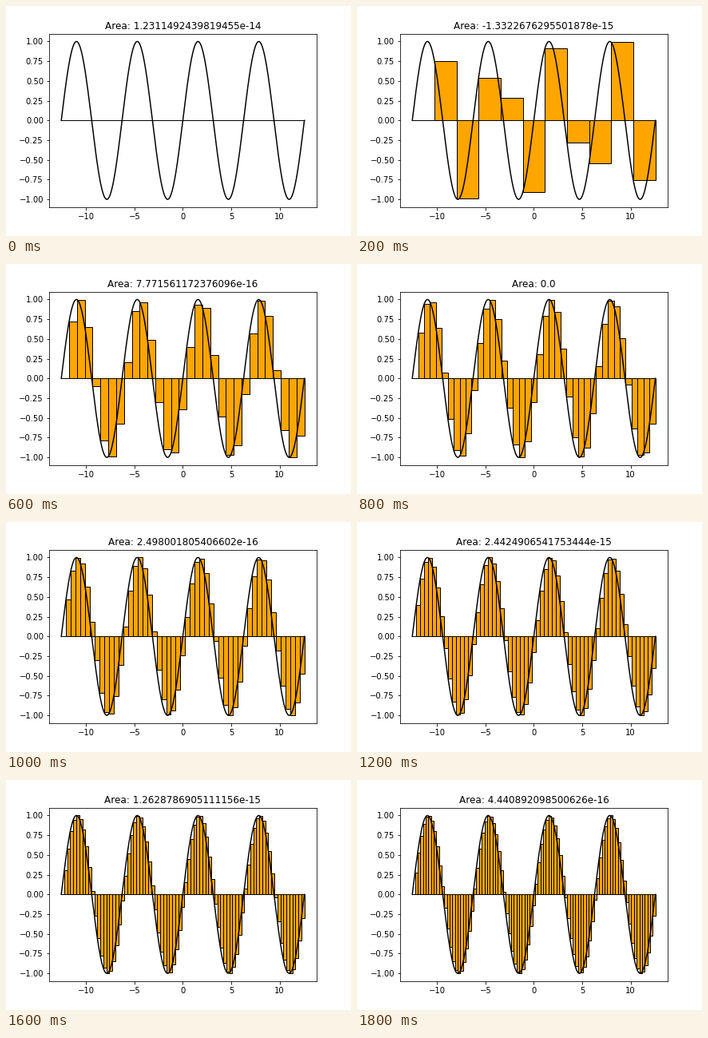
A matplotlib script that plays this animation: 432x288 px, repeating every 2000 ms.

```python
import matplotlib.pyplot as plt
import numpy as np
from matplotlib.animation import FuncAnimation

FRAMES = 10
INTERVAL = 200  # ms
END = 4 * np.pi

fig, ax = plt.subplots(figsize=(6, 4), dpi=72)
fig.subplots_adjust(left=0.125, right=0.9, bottom=0.125, top=0.88)
curve_x = np.linspace(-END, END, 1000)


def riemann(count):
    """Left edges, heights, width and signed area of a left Riemann sum."""
    left = np.linspace(-END, END, count + 1)[:-1]
    width = 2 * END / count
    heights = np.sin(left)
    # Added one by one: the title shows the rounding error of the sum.
    area = float(sum(heights * width))
    return left, heights, width, area


def draw(frame):
    left, heights, width, area = riemann(10 * frame + 1)
    ax.clear()
    ax.plot(curve_x, np.sin(curve_x), color="black")
    ax.bar(left, heights, width, align="edge",
           color="orange", edgecolor="black")
    ax.set_xlim(-1.1 * END, 1.1 * END)
    ax.set_ylim(-1.1, 1.1)
    ax.set_title(f"Area: {area}")
    return ax.get_children()


anim = FuncAnimation(fig, draw, frames=FRAMES, interval=INTERVAL,
                     init_func=lambda: [], repeat=True, repeat_delay=0)
plt.show()
```
